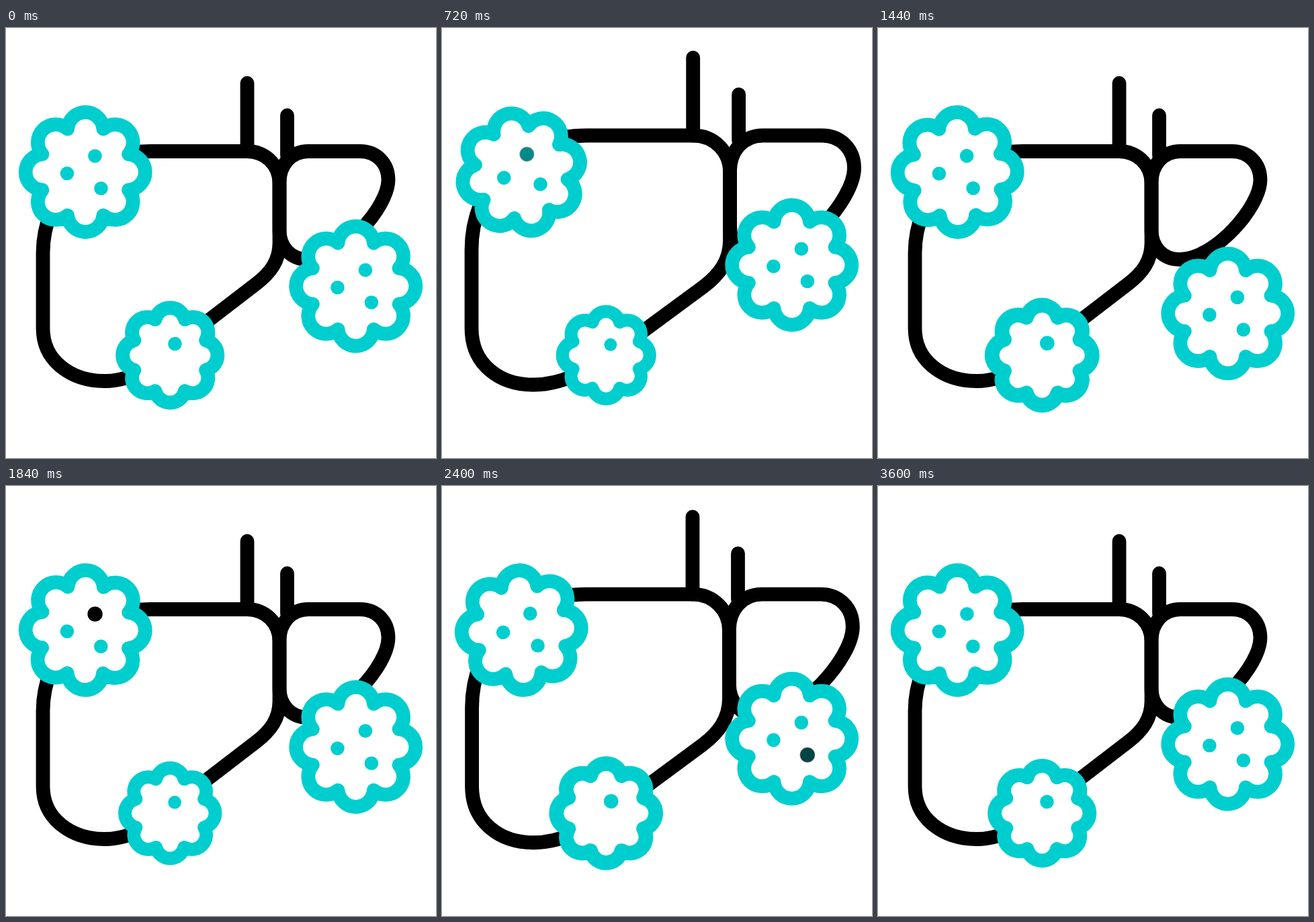
Animation of 640x640 px, one loop 3640 ms. Source, as an HTML page:

```html
<!DOCTYPE html>
<html lang="en">
<head>
<meta charset="utf-8">
<title>Liver with cells</title>
<style>
  html, body { margin: 0; width: 100%; height: 100%; overflow: hidden; background: #fff; }
  svg { display: block; width: 100vw; height: 100vh; }
  path { stroke-width: 20.8; stroke-linecap: round; stroke-linejoin: round; }
  .organ path { fill: none; stroke: #000; }
  .cell path { fill: #fff; stroke: #00cece; }
  .cell circle { fill: #00cece; }
  .cell .flash { fill: #000; }
</style>
</head>
<body>
<svg viewBox="0 0 640 640">
  <g class="organ">
    <path id="main"/>
    <path id="side"/>
    <path id="stems"/>
  </g>
  <g class="cell" id="small"></g>
  <g class="cell" id="left"></g>
  <g class="cell" id="right"></g>
</svg>
<script>
const LOOP = 3640, STEP = 40;
const NS = 'http://www.w3.org/2000/svg';
const $ = id => document.getElementById(id);

function add(parent, tag, attrs) {
  const el = document.createElementNS(NS, tag);
  for (const k in attrs) el.setAttribute(k, attrs[k]);
  return parent.appendChild(el);
}

// Eight round bumps whose ends lie on a ring
function scallop(ring, bump) {
  const pts = [...Array(8)].map((_, i) => {
    const a = (i + 0.5) * Math.PI / 4;
    return `${(ring * Math.cos(a)).toFixed(2)} ${(ring * Math.sin(a)).toFixed(2)}`;
  });
  return `M${pts[7]}` + pts.map(p => `A${bump} ${bump} 0 0 1 ${p}`).join('') + 'Z';
}

function cell(id, ring, bump, dots) {
  add($(id), 'path', { d: scallop(ring, bump) });
  for (const [cx, cy] of dots) add($(id), 'circle', { cx, cy, r: 10.3 });
}

const DOTS = [[14.2, -24], [-27.3, 2], [23.2, 24.2]];
cell('left', 69.6, 26.7, DOTS);
cell('right', 69.6, 26.7, DOTS);
cell('small', 57.8, 22.8, [[7.2, -17]]);

// A dot that flashes black again and again from a first time on
function flash(id, dot, first) {
  const [cx, cy] = DOTS[dot];
  return { first, el: add($(id), 'circle', { cx, cy, r: 11.2, class: 'flash' }) };
}
const flashes = [flash('left', 0, 720), flash('right', 1, 1080), flash('right', 2, 1200)];

const clamp = x => Math.min(1, Math.max(0, x));
const smooth = x => x * x * (3 - 2 * x);
const mix = (a, b, x) => a + (b - a) * smooth(x);

function flashLevel(t, first) {
  if (t < first) return 0;
  const u = (t - first) % 1040;
  return clamp(Math.min(u + 40, 240 - u) / 120);
}

// Eased swings to alternating sides, at rest at both ends
function swing(t, step, count, size) {
  const at = k => k > 0 && k < count ? (k % 2 ? 1 : -1) * size(k) : 0;
  const k = Math.floor(t / step);
  return mix(at(k), at(k + 1), t / step - k);
}

const spin = t => swing(t, 400, 7, k => 48.9 * 0.62 ** k);
const pulse = t => 1 - swing(t, 612, 5, k => k < 3 ? 0.095 : 0.048);

const FLOAT = [[0, 0], [600, -41], [1200, 50], [2200, -15], [2800, 11.2], [3600, 0], [LOOP, 0]];
function float(t) {
  const i = FLOAT.findIndex(key => key[0] > t);
  const [t0, y0] = FLOAT[i - 1], [t1, y1] = FLOAT[i];
  return mix(y0, y1, (t - t0) / (t1 - t0));
}

// One beat: quick swell, then a soft return
function beat(t) {
  if (t < 0 || t > 1080) return 0;
  return t < 720 ? 1 - (1 - t / 720) ** 2 : mix(1, 0, (t - 720) / 360);
}

function drawOrgan(p) {
  const grow = 1 + 0.142 * p;
  // Points that swell about one centre; the left edge and bottom move on their own
  const g = (x, y) => `${255.6 + (x - 255.6) * grow} ${349 + (y - 349) * grow} `;
  const x = 55 - 11 * p, y = 525.5 + 5.5 * p, top = 183.5 - 23.5 * p;

  $('main').setAttribute('d',
    `M${x} ${335 - 5 * p}C${x} ${250 - 15 * p} ${120 - 5 * p} ${top} 215 ${top}` +
    `L${g(359, 183.5)}C${g(386, 183.5)}${g(407, 204)}${g(407, 231)}` +
    `L${g(407, 320)}C${g(407, 347)}${g(393, 365)}${g(372, 381)}` +
    `L303 ${434 + 14.5 * p}C${240 - 10 * p} ${482 + 23 * p} ${x + 150 - 9 * p} ${y} ${x + 92} ${y}` +
    `C${x + 42} ${y} ${x} ${y - 30} ${x} 447Z`);
  $('side').setAttribute('d',
    `M${g(407, 230)}C${g(407, 204)}${g(424, 183.5)}${g(450, 183.5)}` +
    `L${g(527, 183.5)}C${g(552, 183.5)}${g(569, 202)}${g(569, 226)}` +
    `C${g(569, 267)}${g(500, 344.5)}${g(449, 344.5)}` +
    `C${g(424, 344.5)}${g(407, 326)}${g(407, 301)}Z`);
  $('stems').setAttribute('d',
    `M${g(359, 82)}L${g(359, 183.5)}M${g(418.5, 130)}L${g(418.5, 190)}`);
}

function draw(t) {
  drawOrgan(beat(t) + beat(t - 1840));
  $('left').setAttribute('transform', `translate(118.2 214.5) rotate(${spin(t)})`);
  $('right').setAttribute('transform', `translate(520.7 ${384.3 + float(t)})`);
  $('small').setAttribute('transform', `translate(244.2 487) scale(${pulse(t)})`);
  for (const { el, first } of flashes) el.setAttribute('opacity', flashLevel(t, first));
}

const start = performance.now();
function tick() {
  const t = (performance.now() - start) % LOOP;
  draw(Math.floor(t / STEP) * STEP);
  requestAnimationFrame(tick);
}
tick();
</script>
</body>
</html>
```
